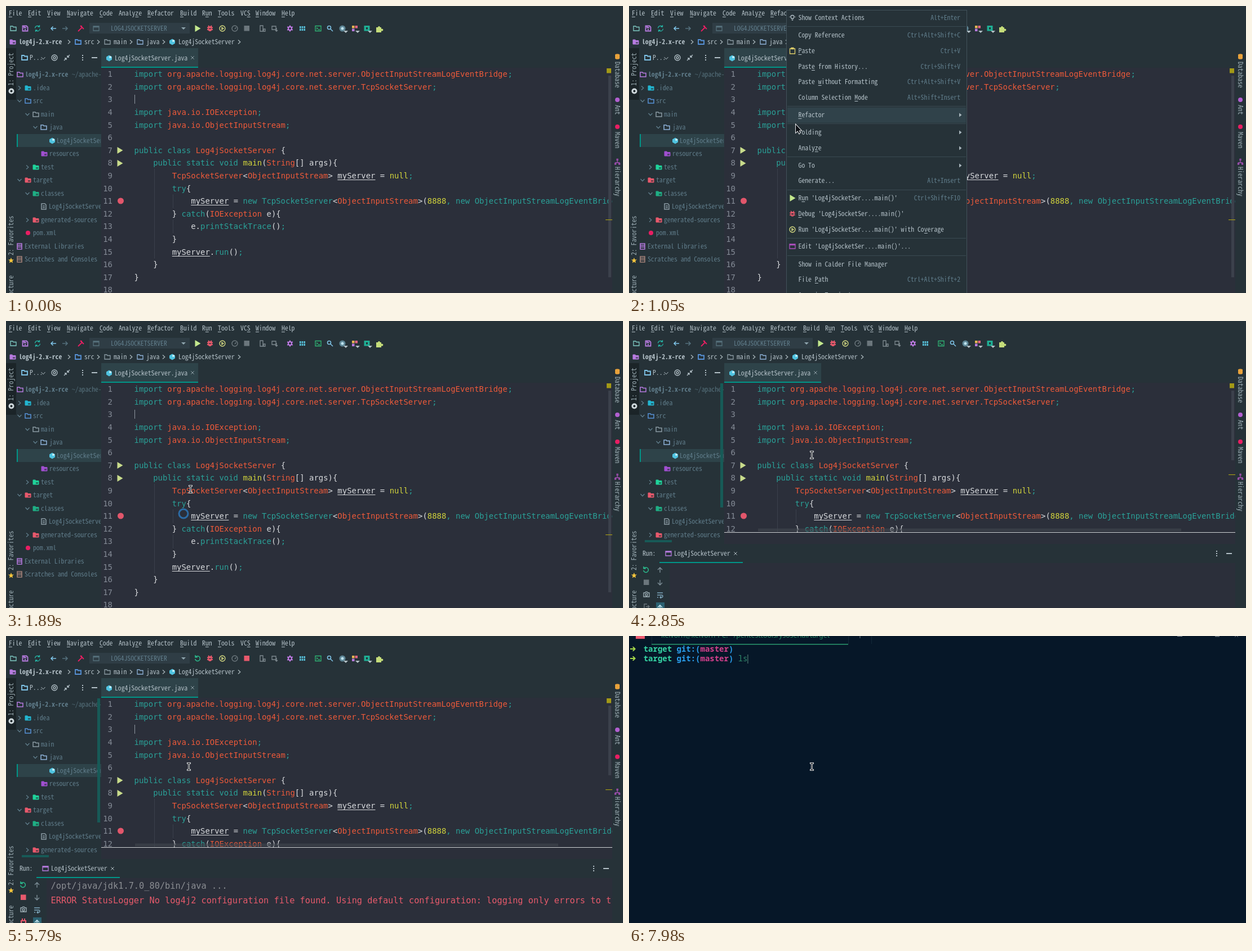
An HTML page with a canvas for the animation above (8 s loop, 1095 px wide and 511 px high).

```html
<!DOCTYPE html>
<html lang="en">
<head>
<meta charset="utf-8">
<title>IDE and terminal</title>
<style>
html, body { margin: 0; width: 100%; height: 100%; overflow: hidden; background: #263238; }
canvas { display: block; }
</style>
</head>
<body>
<canvas id="stage" width="1095" height="511"></canvas>
<script>
const c = document.getElementById('stage').getContext('2d');
const LOOP = 8000;

// Colours
const BAR = '#263238', EDIT = '#2b2f3a', SEL = '#2e4349', TEAL = '#009688';
const UI = '#b4c1c8', DIM = '#607d8b', LIME = '#c3e88d', RED = '#e8596c', CYAN = '#4db6d0',
      PURPLE = '#b77be0', GREY = '#6b767c', PINK = '#e91e63', BLUE = '#8fb3d9', SLATE = '#8a9aa2';
const INK = { t: '#2aa198', o: '#ee5a3a', w: '#d8dadd', u: '#d8dadd', y: '#d3d53c' };

// Pick the size at which a monospace family has the wanted advance.
function mono(family, advance, weight = 'normal') {
  c.font = `${weight} 100px ${family}`;
  return `${weight} ${advance * 100 / c.measureText('0').width}px ${family}`;
}
const NARROW = '"Noto Sans Mono CJK SC", "Noto Sans Mono CJK JP", "Noto Sans Mono", monospace';
const WIDE = '"DejaVu Sans Mono", "Noto Sans Mono", monospace';
const TERM = '"Noto Sans Mono", "DejaVu Sans Mono", monospace';
const ui = mono(NARROW, 5.88), uiBold = mono(NARROW, 5.88, 'bold');
const code = mono(WIDE, 8.39), log = mono(WIDE, 9.22);
const term = mono(TERM, 8.4), termBold = mono(TERM, 8.4, 'bold');

function rect(x, y, w, h, color) {
  c.fillStyle = color;
  c.fillRect(x, y, w, h);
}

// y is the middle of the line of text
function text(s, x, y, color = UI, font = ui, align = 'left') {
  c.font = font;
  c.fillStyle = color;
  c.textAlign = align;
  c.fillText(s, x, Math.round(y) + (font === ui || font === uiBold ? 4 : 5));
}

function turned(s, x, y, dir) {
  c.save();
  c.translate(x, y);
  c.rotate(dir * Math.PI / 2);
  text(s, 0, 0, '#9fb0b7');
  c.restore();
}

// Text with the letter after & underlined
function label(s, x, y) {
  const i = s.indexOf('&');
  text(s.replace('&', ''), x, y);
  if (i >= 0) rect(x + i * 5.88, y + 6, 5.88, 1, UI);
}

function clip(x, y, w, h, paint) {
  c.save();
  c.beginPath();
  c.rect(x, y, w, h);
  c.clip();
  paint();
  c.restore();
}

const PATHS = {
  folder: 'M-5-4h4l1 1.5h5v6.5h-10z',
  save: 'M-4.5-4.5h7l2 2v7h-9zM-2-4v2.5h4M-1 2h2',
  sync: 'M-4.5-.5a4.5 4.5 0 0 1 7.5-3M4.5.5a4.5 4.5 0 0 1-7.5 3M3.5-6v3h-3M-3.5 6v-3h3',
  rerun: 'M-3.5-2.5a4.4 4.4 0 1 1-.8 3.5M-4-6v3.8h3.8',
  left: 'M5 0H-4M-.5-3.5L-4 0L-.5 3.5',
  right: 'M-5 0H4M.5-3.5L4 0L.5 3.5',
  up: 'M0 5V-4M-4 0L0-4L4 0',
  down: 'M0-5V4M-4 0L0 4L4 0',
  hammer: 'M-5 5L2-2M-1-5L5 1M-1-4l3 0',
  play: 'M-4.5-6L5.5 0L-4.5 6z',
  drop: 'M-4-2h8L0 2z',
  sub: 'M-2-3.5L2.5 0L-2 3.5z',
  bug: 'M-2.5-2.5h5v4a2.5 2.5 0 0 1-5 0zM-5-1.5h10M-5 2h10M-3-5l2 2M3-5l-2 2',
  cover: 'M-5 0a5 5 0 1 0 10 0a5 5 0 1 0-10 0M-1-2L2 0L-1 2z',
  gauge: 'M-5 0a5 5 0 1 1 10 0a5 5 0 1 1-10 0M0 1L2.5-2',
  phone: 'M-4-5h5v10h-5zM2 1h3v4h-3z',
  cube: 'M-5-4h7v6h-7zM3-1v6M1 3l2 2l2-2',
  gear: 'M-3 0a3 3 0 1 0 6 0a3 3 0 1 0-6 0M0-5.5v2M0 5.5v-2M-4.8-2.8l1.7 1M4.8 2.8l-1.7-1M-4.8 2.8l1.7-1M4.8-2.8l-1.7 1',
  grid: 'M-5-4h2.6v3.5h-2.6zM-1.3-4h2.6v3.5h-2.6zM2.4-4h2.6v3.5h-2.6zM-5 .6h2.6v3.5h-2.6zM-1.3.6h2.6v3.5h-2.6zM2.4.6h2.6v3.5h-2.6z',
  shell: 'M-5-4.5h10v9h-10zM-3-1.5l2 1.5l-2 1.5M0 2h3',
  find: 'M-4.5-1.5a3 3 0 1 0 6 0a3 3 0 1 0-6 0M1 1L5 5',
  puzzle: 'M-5-3h3a2 2 0 1 1 4 0h2v3a2 2 0 1 1 0 3v3h-9z',
  next: 'M-2-3.5L1.8 0L-2 3.5',
  open: 'M-3.5-2L0 1.8L3.5-2',
  cross: 'M-2.7-2.7l5.4 5.4M2.7-2.7l-5.4 5.4',
  minus: 'M-5 0h10',
  aim: 'M-5 0a5 5 0 1 0 10 0a5 5 0 1 0-10 0M-2 0a2 2 0 1 0 4 0a2 2 0 1 0-4 0',
  shrink: 'M5-5L1-1M1-4v3h3M-5 5L-1 1M-4 1h3v3',
  klass: 'M-5-2.5L0-5.5L5-2.5V2.5L0 5.5L-5 2.5z',
  file: 'M-4-5h6l2 2v8h-8zM-2-1h4M-2 2h4',
  window: 'M-5-4h10v8h-10zM-5-2.5h10',
  book: 'M-4-5h8v10h-8zM-4-2h8M-4 1h8',
  star: 'M0-5L1.4-1.6L5-1.4L2.2.8L3.1 4.4L0 2.4L-3.1 4.4L-2.2.8L-5-1.4L-1.4-1.6z',
  disk: 'M-4-3a4 1.8 0 0 1 8 0v6a4 1.8 0 0 1-8 0z',
  tree: 'M0-2v4M-3.5 3v-1h7v1M-1-4.5h2v2h-2zM-4.5 3h2v2h-2zM2.5 3h2v2h-2z',
  bulb: 'M-3-1.5a3 3 0 1 1 6 0l-1.5 3h-3zM-1.2 4h2.4M-5.5-1.5h1M4.5-1.5h1',
  clip: 'M-4.5-4h9v9h-9zM-2-5.5h4v2h-4z',
  camera: 'M-5-3h2.5l1-1.5h3l1 1.5h2.5v7h-10zM-2 .5a2 2 0 1 0 4 0a2 2 0 1 0-4 0',
  exit: 'M1-4h-5v9h5M-1 .5h6M2.5-2L5 .5L2.5 3',
  plug: 'M-4-1h8v3l-2 2.5h-4l-2-2.5zM-2-5v4M2-5v4',
  wrap: 'M-5-4h10M-5 0h8a2 2 0 0 1 0 4h-3M2 2L0 4l2 2M-5 4h2',
  arrow: 'M0 0V14L3.4 11L5.6 15.5L7.6 14.6L5.6 10.2H9.5z',
  prompt: 'M-5-1H1L-1-4H1L5 0L1 4H-1L1 1H-5z',
};
const SHAPES = Object.fromEntries(Object.entries(PATHS).map(([k, d]) => [k, new Path2D(d)]));

// A width of 0 fills the shape
function icon(name, x, y, color, width = 1.3) {
  c.save();
  c.translate(x, y);
  c.lineWidth = width;
  c.fillStyle = c.strokeStyle = color;
  if (width) c.stroke(SHAPES[name]); else c.fill(SHAPES[name]);
  c.restore();
}

function dot(x, y, r, color) {
  c.fillStyle = color;
  c.beginPath();
  c.arc(x, y, r, 0, 7);
  c.fill();
}

function klass(x, y) {
  icon('klass', x, y, '#4fc3e0', 0);
  dot(x + 2, y - 2, 2, '#c9eef7');
}

// Solid folder with a small badge
function badged(x, y, color) {
  icon('folder', x, y, color, 0);
  icon('folder', x, y, color, 1);
  rect(x, y, 4, 3, '#26323899');
}

function dots(x, y) {
  for (const d of [-4, 0, 4]) rect(x - 1, y + d - 1, 2, 2, UI);
}

// --- IDE -----------------------------------------------------------------

const MENUS = [['&File', 5], ['&Edit', 39], ['&View', 73], ['&Navigate', 108], ['&Code', 166],
  ['Analy&ze', 200], ['&Refactor', 251], ['&Build', 309], ['R&un', 348], ['&Tools', 376],
  ['VC&S', 416], ['&Window', 443], ['&Help', 489]];

function topBars(running) {
  for (const [s, x] of MENUS) label(s, x, 13);

  const y = 40;
  icon('folder', 13, y, '#80cbc4');
  icon('save', 34, y, PURPLE, 1.8);
  icon('sync', 56, y, '#26b5a6');
  icon('left', 84, y, '#7fc4e8', 1.6);
  icon('right', 105, y, '#54707c', 1.6);
  icon('hammer', 133, y, PINK, 1.8);
  rect(148, 30, 178, 19, '#2f3d45');
  icon('window', 160, y, '#56707b');
  text('LOG4JSOCKETSERVER', 186, y, DIM);
  icon('drop', 315, y, '#8fa5ae', 0);
  if (running) icon('rerun', 340, y, '#2bbd8e', 1.5);
  else icon('play', 340, y, LIME, 0);
  icon('bug', 362, y, RED, 1.8);
  icon('cover', 384, y, '#d8dd83');
  icon('gauge', 406, y, GREY, 1.5);
  rect(422.5, 35, 9.5, 9.5, running ? RED : GREY);
  icon('phone', 455, y, '#7d898f');
  icon('cube', 477, y, '#7d898f');
  icon('gear', 504, y, '#c17be6', 2);
  icon('grid', 526, y, '#58c3dd', 0);
  icon('shell', 554, y, '#2fb574');
  icon('find', 575, y, '#7fc4e8', 1.5);
  dot(597, y, 5.5, '#5e8797');
  dot(597, y, 2.5, '#bfe3ee');
  rect(614, 35, 4.5, 4.5, '#e4b552');
  rect(619.5, 35, 4.5, 4.5, '#e46480');
  rect(614, 40.5, 4.5, 4.5, PURPLE);
  rect(635.5, 35, 10, 9.5, '#1fae94');
  rect(639, 38, 3, 3.5, BAR);
  for (const x of [603, 624, 646]) icon('drop', x, 46, UI, 0);
  icon('puzzle', 662, y + 1, '#c5dd7a', 0);

  const b = 64;
  badged(12, b, PURPLE);
  text('log4j-2.x-rce', 23, b, UI, uiBold);
  icon('folder', 128, b, '#5792d8', 1.8);
  text('src', 139, b);
  icon('folder', 180, b, SLATE);
  text('main', 191, b);
  icon('folder', 238, b, BLUE);
  text('java', 249, b);
  klass(295, b);
  text('Log4jSocketServer', 306, b);
  for (const x of [112, 164, 222, 280, 414]) icon('next', x, b, '#a8b5ba');
}

function sideStripes() {
  rect(0, 75, 18, 92, '#1b2428');
  turned('1: Project', 9, 142, -1);
  dot(9.5, 151.5, 5, '#cfd8dc');
  dot(9.5, 151.5, 2, '#1b2428');
  turned('2: Favorites', 9, 444, -1);
  icon('star', 9, 453, '#f5c63d', 0);
  turned('7: Structure', 9, 550, -1);

  rect(1076, 75, 19, 436, BAR);
  icon('disk', 1085, 90, '#e9a23b', 0);
  turned('Database', 1085, 99, 1);
  dot(1085, 167, 4, '#b25fd0');
  turned('Ant', 1085, 176, 1);
  dot(1085, 215, 4, PINK);
  turned('Maven', 1085, 224, 1);
  icon('tree', 1085, 277, '#a04fb0');
  turned('Hierarchy', 1085, 286, 1);
}

// arrow x, arrow, icon, icon colour, icon x, text x, text
const ROWS = [
  [0, '', 'folder', PURPLE, 25, 34, ''],
  [24, 'next', 'badged', '#22b5d0', 39, 48, '.idea'],
  [24, 'open', 'folder', '#5792d8', 39, 48, 'src'],
  [38, 'open', 'folder', SLATE, 53, 62, 'main'],
  [52, 'open', 'folder', BLUE, 67, 77, 'java'],
  [0, '', 'klass', CYAN, 82, 90, 'Log4jSocketServer'],
  [0, '', 'badged', '#a04fd0', 68, 77, 'resources'],
  [38, 'next', 'badged', '#1fd39a', 53, 62, 'test'],
  [24, 'open', 'badged', RED, 39, 48, 'target'],
  [38, 'open', 'badged', '#1fae84', 53, 62, 'classes'],
  [0, '', 'file', SLATE, 67, 76, 'Log4jSocketServer'],
  [38, 'next', 'badged', RED, 53, 62, 'generated-sources'],
  [0, '', 'dot', PINK, 39, 48, 'pom.xml'],
  [0, '', 'book', PURPLE, 24, 33, 'External Libraries'],
  [0, '', 'book', '#a5837a', 24, 33, 'Scratches and Consoles'],
];

function project() {
  icon('folder', 33, 92, '#7fc4e8', 1.8);
  text('P...', 42, 92);
  icon('open', 66, 93, UI, 1);
  icon('aim', 86, 92, UI);
  icon('shrink', 108, 92, UI);
  dots(136, 92);
  icon('minus', 157, 92, UI, 2);

  rect(19, 228, 150, 23, SEL);
  rect(19, 228, 2, 23, TEAL);
  clip(19, 108, 149, 403, () => {
    ROWS.forEach(([ax, arrow, name, color, ix, tx, s], i) => {
      const y = Math.round(122 + 23.5 * i);
      if (arrow) icon(arrow, ax, y, DIM);
      if (name === 'klass') klass(ix, y);
      else if (name === 'dot') dot(ix, y, 4, color);
      else if (name === 'badged') badged(ix, y, color);
      else icon(name, ix, y, color, 1.5);
      text(s, tx, y, DIM);
    });
    text('log4j-2.x-rce', 34, 122, DIM, uiBold);
    text('~/apache-log4j', 117, 122, '#56717c');
  });
}

// ^ plus a colour key starts a run; u is underlined
const LINES = [
  '^timport ^oorg.apache.logging.log4j.core.net.server.ObjectInputStreamLogEventBridge^t;',
  '^timport ^oorg.apache.logging.log4j.core.net.server.TcpSocketServer^t;',
  '',
  '^timport ^ojava.io.IOException^t;',
  '^timport ^ojava.io.ObjectInputStream^t;',
  '',
  '^tpublic class ^oLog4jSocketServer ^w{',
  '^t    public static void ^ymain^w(^oString^w[] args){',
  '^o        TcpSocketServer^w<^oObjectInputStream^w> ^umyServer^w = ^ynull^t;',
  '^t        try^w{',
  '^w            ^umyServer^w = ^tnew TcpSocketServer^w<^oObjectInputStream^w>(^y8888^t, new ObjectInputStreamLogEventBridge());',
  '^w        } ^tcatch^w(^oIOException^w e){',
  '^w            e.^tprintStackTrace^w()^t;',
  '^w        }',
  '^w        ^umyServer^w.^trun^w()^t;',
  '^w    }',
  '^w}',
  '',
];

function codeLine(line, y) {
  let x = 227.6;
  for (const run of line.split('^').slice(1)) {
    const s = run.slice(1), w = s.length * 8.39;
    text(s, x, y, INK[run[0]], code);
    if (run[0] === 'u') rect(x, y + 7, w, 1, INK.u);
    x += w;
  }
}

function editor(split, caret) {
  const bottom = split ? 376 : 511;
  rect(169, 75, 172, 35, SEL);
  rect(169, 108, 172, 2, TEAL);
  klass(183, 93);
  text('Log4jSocketServer.java', 193, 93);
  icon('cross', 331, 92, '#93a3aa', 1);

  rect(169, 110, 907, 401, EDIT);
  clip(169, 110, 907, bottom - 110, () => {
    c.setLineDash([1, 1]);
    c.strokeStyle = '#4a515e';
    c.lineWidth = 1;
    c.beginPath();
    for (const [x, a, b] of [[263.5, 290, 449], [296.5, 336, 359], [296.5, 381, 404]]) {
      c.moveTo(x, a);
      c.lineTo(x, b);
    }
    c.stroke();
    c.setLineDash([]);
    LINES.forEach((line, i) => {
      const y = Math.round(121.2 + 22.6 * i);
      text(i + 1, 189, y, '#848b96', code, 'right');
      codeLine(line, y);
    });
    icon('play', 202, 257, '#c9dc8c', 0);
    icon('play', 202, 280, '#c9dc8c', 0);
    dot(203.5, 347, 5.5, '#e2566b');
    if (caret) rect(228, 158, 1, 16, '#8f979f');
  });
  rect(1069, 124, 5, split ? 124 : 359, '#3c414c');
  rect(1066, 111, 8, 8.5, '#a39a16');
  rect(1064, split ? 273 : 380, 12, 1.2, '#a39a16');
}

function runPanel(t, running) {
  rect(162, 111, 5, 221, '#175a57');
  rect(28, 390, 48, 4, '#175a57');
  rect(229, 369.5, 751, 5, '#42474f99');
  rect(169, 376, 907, 1, '#cfd2d4');
  rect(19, 397, 1057, 114, BAR);
  rect(54, 429, 148, 2, TEAL);
  text('Run:', 24, 414);
  icon('window', 70, 414, PURPLE);
  text('Log4jSocketServer', 80, 414);
  icon('cross', 189, 414, '#b2bec3', 1);
  dots(1043, 414);
  icon('minus', 1065, 414, UI, 2);

  rect(72, 431, 1004, 80, EDIT);
  icon('rerun', 30, 443, '#2bbd8e', 1.5);
  rect(26, 460.5, 9.5, 9.5, running ? RED : GREY);
  icon('camera', 31, 487, '#9fb0b7');
  icon(t >= 5580 ? 'plug' : 'exit', 31, 508, running ? RED : GREY, t >= 5580 ? 2 : 1.4);
  icon('up', 55, 443, '#7d8f97', 1.4);
  icon('down', 55, 466, '#7d8f97', 1.4);
  icon('wrap', 55, 488, '#7fa8bd');
  rect(48, 501, 15, 10, '#2c6272');
  icon('up', 55, 510, '#b9dce8', 1.6);
  clip(72, 431, 1002, 80, () => {
    if (running) text('/opt/java/jdk1.7.0_80/bin/java ...', 79.5, 445, '#8b8e93', log);
    if (t >= 3620) text('ERROR StatusLogger No log4j2 configuration file found. Using default configuration: logging only errors to the console.', 79.5, 471, '#e65a6b', log);
  });
}

// y, text, shortcut ('>' opens a submenu), icon, colour
const POPUP = [
  [21, 'Show Context Actions', 'Alt+Enter', 'bulb', UI],
  [52, 'Copy Reference', 'Ctrl+Alt+Shift+C'],
  [80, '&Paste', 'Ctrl+V', 'clip', '#e0cf6a'],
  [108, 'Past&e from History...', 'Ctrl+Shift+V'],
  [135, 'Paste &without Formatting', 'Ctrl+Alt+Shift+V'],
  [163, 'Column Selection &Mode', 'Alt+Shift+Insert'],
  [194, '&Refactor', '>'],
  [225, 'Folding', '>'],
  [253, 'Analy&ze', '>'],
  [284, 'Go To', '>'],
  [311, 'Generate...', 'Alt+Insert'],
  [342, "R&un 'Log4jSocketSer....main()'", 'Ctrl+Shift+F10', 'play', LIME],
  [370, "&Debug 'Log4jSocketSer....main()'", '', 'bug', RED],
  [398, "Run 'Log4jSocketSer....main()' with Co&verage", '', 'cover', '#d8dd83'],
  [428, "Edit 'Log4jSocketSer....main()'...", '', 'window', '#b04fc0'],
  [460, 'Show in Calder File Manager', ''],
  [487, 'File &Path', 'Ctrl+Alt+Shift+2'],
  [515, 'Open in Terminal', ''],
];

function popup(hover) {
  rect(279, 7, 321, 504, '#42525a');
  rect(280, 8, 319, 503, BAR);
  for (const y of [36, 178, 209, 268, 327, 413, 444]) rect(281, y, 317, 1, '#3a4a52');
  for (const [y, s, key, name, color] of POPUP) {
    if (Math.abs(hover - y) < 14) rect(281, y - 13.5, 317, 27.5, '#30424a');
    if (name) icon(name, 290, y, color, name === 'play' ? 0 : 1.3);
    label(s, 300.5, y);
    if (key === '>') icon('sub', 588, y, '#a9b7bd', 0);
    else text(key, 588, y, DIM, ui, 'right');
  }
}

// --- Pointer -------------------------------------------------------------

const TRACK = [[240, 420, 505], [700, 279, 158], [850, 280, 160], [1000, 291, 178], [1050, 296, 211],
  [1580, 315, 343], [1800, 315, 343], [1890, 327, 299], [2270, 324, 238], [2850, 324, 238], [2900, 324, 232]];

function pointerAt(t) {
  const i = TRACK.findIndex(k => k[0] > t);
  if (i < 0) return TRACK.at(-1).slice(1);
  const [t0, x0, y0] = TRACK[i - 1], [t1, x1, y1] = TRACK[i];
  const p = (t - t0) / (t1 - t0);
  return [x0 + (x1 - x0) * p, y0 + (y1 - y0) * p];
}

// Dark core with a light outline
function beam(x, y) {
  x = Math.round(x);
  y = Math.round(y);
  const parts = [[-2, -6, 5, 1], [0, -6, 1, 13], [-2, 6, 5, 1]];
  for (const [dx, dy, w, h] of parts) rect(x + dx - 1, y + dy - 1, w + 2, h + 2, '#d5d8da');
  for (const [dx, dy, w, h] of parts) rect(x + dx, y + dy, w, h, '#0c0f14');
}

function pointer(t, menuOpen) {
  const [x, y] = pointerAt(t);
  if (menuOpen) {
    icon('arrow', x, y, '#e8eaec', 2);
    icon('arrow', x, y, '#0c0f14', 0);
    return;
  }
  if (t >= 1750 && t < 1950) {
    c.strokeStyle = '#2c6ca6';
    c.lineWidth = 3;
    c.beginPath();
    c.arc(315, 343, 8, 0, 7);
    c.stroke();
  }
  if (t < 1750 || t >= 1850) beam(x, y);
}

const within = (t, spans) => spans.some(([a, b]) => t >= a && t < b);

function ide(t) {
  const running = t >= 3230, split = t >= 2580, menuOpen = t >= 800 && t < 1750;
  rect(0, 0, 1095, 511, BAR);
  topBars(running);
  project();
  editor(split, within(t, [[0, 50], [500, 800], [1750, 2850], [3990, 4640], [5080, 5860]]));
  if (split) runPanel(t, running);
  sideStripes();
  if (menuOpen) popup(pointerAt(t)[1] - 8);
  if (t >= 240) pointer(t, menuOpen);
}

// --- Terminal ------------------------------------------------------------

function prompt(y) {
  const parts = [['target', 3, '#35d6a5'], ['git:(', 10, '#2a9fee'],
    ['master', 15, '#d2408c'], [')', 21, '#2a9fee']];
  icon('prompt', 7, y, '#a5d84a', 0);
  for (const [s, col, color] of parts) text(s, 0.5 + col * 8.4, y, color, termBold);
}

function terminal(t) {
  rect(0, 0, 1095, 511, '#061728');
  rect(12, 0, 16, 5, '#ee5a70');
  c.font = '12.2px "Noto Sans", sans-serif';
  c.fillStyle = '#2a8a66';
  c.textAlign = 'left';
  c.fillText('kelvorn@kelvorn-PC: ~/pentesttools/ysoserial/target', 57, 3);
  for (const x of [40, 389, 430]) rect(x, 0, 1, 14, '#132838');
  rect(40, 14, 349, 1.5, '#2a9a6f');
  rect(409.5, 0, 1, 4, '#6d7d86');
  rect(973, 0, 9, 1, '#8795a0');
  rect(1040, 0, 8, 1.5, '#66747f');
  icon('cross', 1078, -1, '#8795a0', 1);

  const entered = t >= 7170;
  const typed = 'ls'.slice(0, t >= 7900 ? 2 : t >= 7820 ? 1 : 0);
  const y = entered ? 40 : 23;
  prompt(23);
  if (entered) prompt(40);
  text(typed, 193.7, 40, '#2f8a6b', term);
  if (within(t, [[5860, 6400], [6990, 7740], [7820, 7900], [7980, 8000]]))
    rect(193.6 + typed.length * 8.4, y - 7, 1, 16, '#5f8f80');
  beam(324, 232);
}

function frame(now) {
  const t = now % LOOP;
  if (t < 5860) ide(t); else terminal(t);
  requestAnimationFrame(frame);
}
requestAnimationFrame(frame);
</script>
</body>
</html>
```
